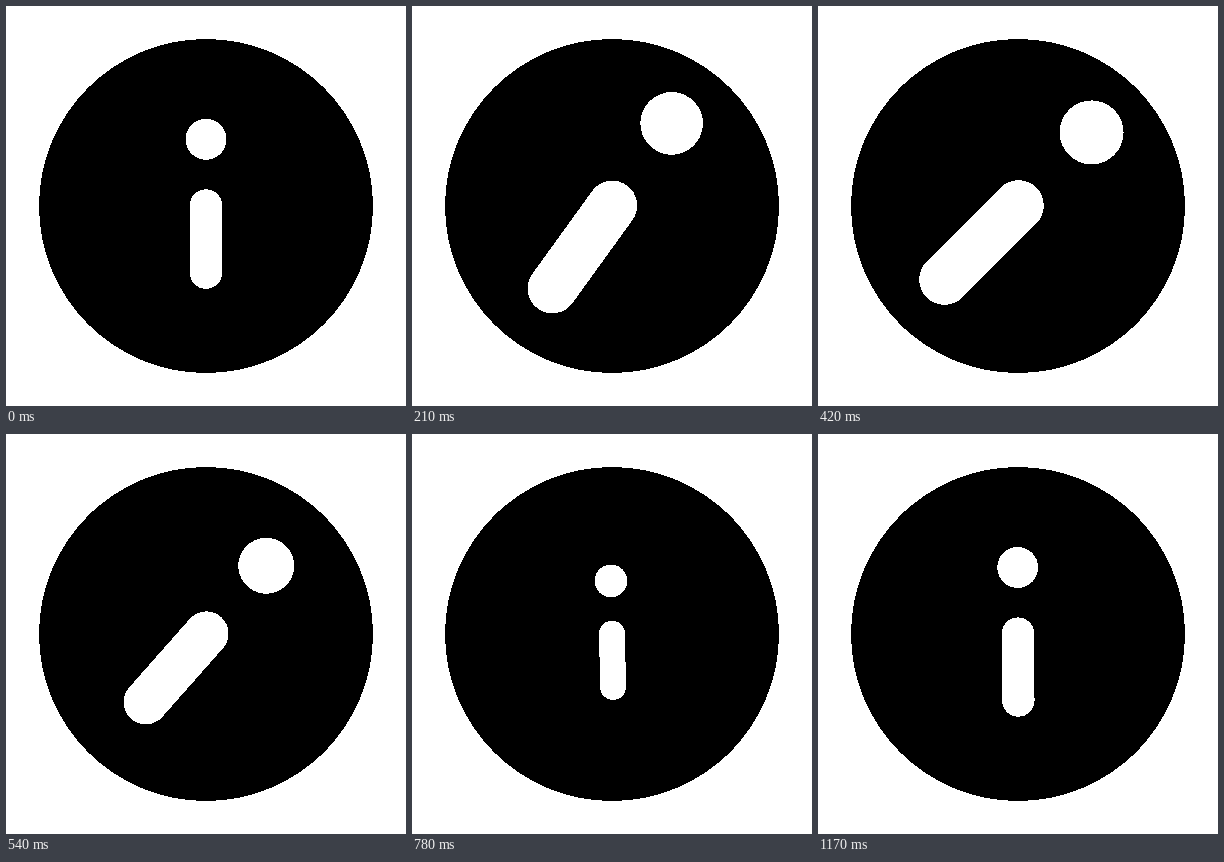
An HTML page for the animation above (1200 ms loop, 400x400 px).

```html
<!DOCTYPE html>
<html lang="en">
<head>
<meta charset="utf-8">
<title>Info icon</title>
<style>
  html, body { margin: 0; width: 100%; height: 100%; overflow: hidden; background: #fff; }
  svg { display: block; width: 100vw; height: 100vh; }
  #mark { transform-origin: 200px 200px; }
</style>
</head>
<body>
<svg viewBox="0 0 400 400" shape-rendering="crispEdges">
  <circle cx="200" cy="200" r="167"/>
  <g id="mark" fill="#fff" stroke="#fff">
    <circle cx="200" cy="133.33" r="20.5" stroke="none"/>
    <path d="M200 199.6V266.6" stroke-width="32.5" stroke-linecap="round"/>
  </g>
</svg>
<script>
const LOOP = 1200, STEP = 30;
const mark = document.getElementById('mark');

// Each key: time in ms, value, easing towards the next key
function track(prop, keys) {
  const frames = keys.map(([t, value, easing = 'linear']) => ({ offset: t / LOOP, [prop]: value, easing }));
  const anim = mark.animate(frames, { duration: LOOP, fill: 'both' });
  anim.pause();
  return anim;
}

const tracks = [
  track('rotate', [
    [0, '0deg', 'ease'], [425, '45deg'], [460, '45deg', 'ease-in-out'],
    [915, '-11.5deg', 'ease-in-out'], [LOOP, '0deg'],
  ]),
  track('scale', [
    [0, '1', 'ease'], [305, '1.565'], [444, '1.56', 'ease-in-out'],
    [720, '0.79', 'ease-in-out'], [LOOP, '1'],
  ]),
];

const start = performance.now();

function draw(now) {
  const t = Math.floor(Math.max(0, now - start) % LOOP / STEP) * STEP;
  for (const anim of tracks) anim.currentTime = t;
  requestAnimationFrame(draw);
}
draw(start);
</script>
</body>
</html>
```
